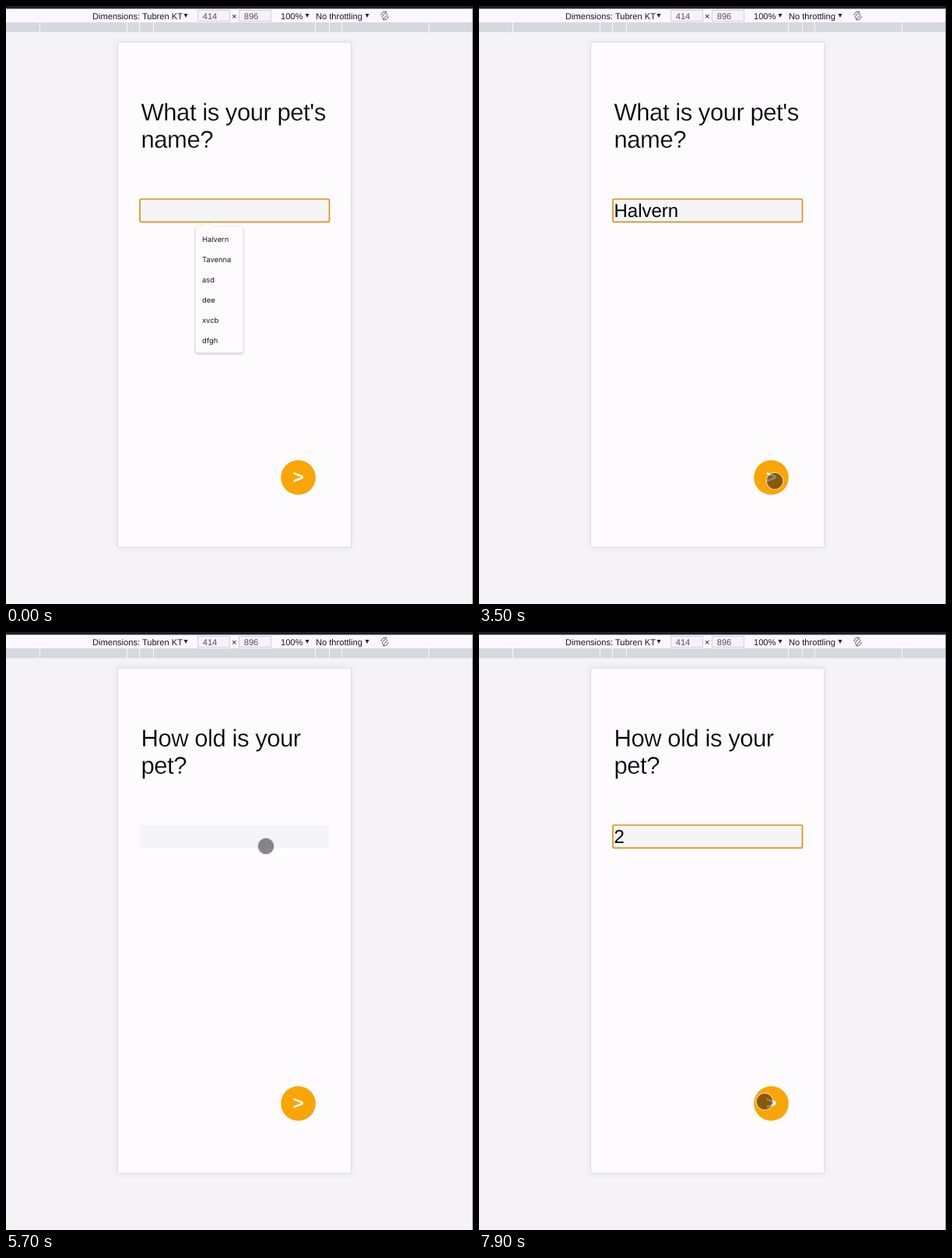
Write an HTML page that moves like this. It is 600 by 768 pixels and loops after 8000 ms.

```html
<!DOCTYPE html>
<html lang="en">
<head>
<meta charset="utf-8">
<title>Pet form</title>
<style>
  html, body { margin: 0; width: 100%; height: 100%; overflow: hidden; background: #f5f3f7; }
  svg { display: block; width: 600px; height: 768px; }
  text { font-family: "Liberation Sans", Arial, sans-serif; white-space: pre; text-rendering: geometricPrecision; }
  .bar { font-size: 11.1px; fill: #1a161e; }
  .size { fill: #55515a; text-anchor: middle; }
  .box { fill: #f5f2f8; stroke: #d2cfd8; }
  .title { font-size: 31px; letter-spacing: -.45px; stroke: #fdfbfe; stroke-width: .3px; }
  .item { font-family: Inter, "Liberation Sans", sans-serif; font-size: 9.4px; fill: #18161a; }
  .value { font-size: 24px; }
  .next { font-size: 24px; font-weight: 700; fill: #fff; text-anchor: middle; }
  .menu { filter: drop-shadow(0 1px 1.5px rgba(0, 0, 0, .3)); }
  .phone { filter: drop-shadow(0 0 5px rgba(0, 0, 0, .06)); }
</style>
</head>
<body>
<svg viewBox="0 0 600 768">
  <rect width="600" height="768" fill="#f5f3f7"/>
  <rect width="600" height="21" fill="#fbf8fd"/>
  <rect width="600" height="3.5" fill="#251c28"/>
  <rect y="21" width="600" height="12.5" fill="#d6d8df"/>
  <path id="ticks" stroke="#f7f6f9"/>

  <text class="bar" x="111" y="17">Dimensions: Tubren KT</text>
  <rect class="box" x="246.5" y="5.5" width="41" height="14"/>
  <text class="bar size" x="262" y="17">414</text>
  <text class="bar" x="290" y="17">×</text>
  <rect class="box" x="299.5" y="5.5" width="41" height="14"/>
  <text class="bar size" x="315" y="17">896</text>
  <text class="bar" x="353" y="17">100%</text>
  <text class="bar" x="398" y="17">No throttling</text>
  <path d="M228.500 10h5l-2.500 5zM384.500 10h5l-2.500 5zM461.500 10h5l-2.500 5z" fill="#28242c"/>
  <g fill="none" stroke="#4b4750" transform="translate(486.500 12.500) rotate(40) scale(.88)">
    <rect x="-2" y="-4.200" width="4" height="8.400" rx="1"/>
    <path d="M-1-6.200A6 6 0 0 0-4.500 3M1 6.200A6 6 0 0 0 4.500-3"/>
  </g>

  <rect class="phone" x="143.500" y="46.500" width="300" height="648.500" fill="#fdfbfe" stroke="#dedde1"/>
  <text class="title" x="173.500" y="147" id="line1"></text>
  <text class="title" x="173.500" y="182" id="line2"></text>

  <rect x="172" y="248" width="243" height="29" fill="#f5f4f6"/>
  <rect id="ring" x="172" y="248" width="243.500" height="29.300" rx="1.500" fill="none" stroke="#d9941a" stroke-width="1.700"/>
  <text class="value" x="173.500" y="271" id="value"></text>
  <rect id="caret" y="249" width="1.200" height="27" fill="#222"/>

  <g class="menu" id="menu">
    <rect id="panel" x="243.500" y="283.500" width="61" rx="3" fill="#fdfbfe"/>
    <path d="M252 284l6.500-6 6.500 6z" fill="#fdfbfe"/>
    <g id="items"></g>
  </g>

  <circle cx="375.500" cy="605.500" r="22.300" fill="#f9a504"/>
  <text class="next" x="375.500" y="613">&gt;</text>
  <g id="touch">
    <circle r="10.300" fill-opacity=".46"/>
    <circle r="11" fill="none" stroke="#e4e0e4" stroke-opacity=".5" stroke-width="1.500"/>
  </g>
  <path d="M599.500 3v765" stroke="#8f8d92"/>
</svg>
<script>
const LOOP = 8000, STEP = 100;
const NAME = "Halvern", FIRST_KEY = 100, KEY_GAP = 300;
const SUBMIT = 3900, FOCUS = 6200, AGE_KEY = 7200;
const OPTIONS = [NAME, "Tavenna", "asd", "dee", "xvcb", "dfgh"];

const linear = k => k;
const easeOut = k => 1 - (1 - k) ** 2;

// Pointer moves along Bezier curves; each shows from `at` until `until`.
const MOVES = [
  { at: 2700, until: 3700, time: 800, ease: easeOut, path: [[592, 470], [450, 590], [380, 610]] },
  { at: 3700, until: 4700, time: 1000, ease: linear, path: [[380, 610], [390, 619]] },
  { at: 4700, until: 6200, time: 1000, ease: easeOut, path: [[390, 619], [620, 500], [222, 90], [334, 275]] },
  { at: 6200, until: 6500, time: 200, ease: linear, path: [[334, 275], [453, 277]] },
  { at: 7300, until: 7600, time: 200, ease: easeOut, path: [[493, 640], [432, 655]] },
  { at: 7600, until: 8000, time: 300, ease: easeOut, path: [[432, 655], [367, 603]] }
];

const el = id => document.getElementById(id);
const show = (node, on) => { node.style.display = on ? "" : "none"; };
const mix = (a, b, k) => a.map((v, i) => v + (b[i] - v) * k);

function bezier(points, k) {
  if (points.length === 1) return points[0];
  return bezier(points.slice(1).map((p, i) => mix(points[i], p, k)), k);
}

function pointerAt(t) {
  const move = MOVES.find(m => t >= m.at && t < m.until);
  return move && bezier(move.path, move.ease(Math.min(1, (t - move.at) / move.time)));
}

el("ticks").setAttribute("d",
  [43, 155, 171, 189, 397, 415, 431, 543].map(x => `M${x + .5} 21v12.5`).join(""));

const items = OPTIONS.map((word, i) => {
  const node = document.createElementNS("http://www.w3.org/2000/svg", "text");
  node.setAttribute("class", "item");
  node.setAttribute("x", 252);
  node.setAttribute("y", 303 + 26 * i);
  node.textContent = word;
  el("items").append(node);
  return node;
});

function draw(t) {
  const second = t >= SUBMIT;
  const typed = Math.min(NAME.length, Math.floor((t - FIRST_KEY) / KEY_GAP) + 1);
  const focused = !second || t >= FOCUS;

  el("line1").textContent = second ? "How old is your" : "What is your pet's";
  el("line2").textContent = second ? "pet?" : "name?";
  el("value").textContent = second ? (t >= AGE_KEY ? "2" : "") : NAME.slice(0, typed);
  show(el("ring"), focused);

  // The caret restarts its blink on every input.
  const nameKey = FIRST_KEY + (typed - 1) * KEY_GAP;
  const last = !second ? nameKey : t >= AGE_KEY ? AGE_KEY : FOCUS;
  show(el("caret"), focused && t >= FIRST_KEY && (t - last) % 1000 < 500);
  el("caret").setAttribute("x", 173.2 + el("value").getComputedTextLength());

  const count = typed ? 1 : OPTIONS.length;
  show(el("menu"), typed < NAME.length);
  el("panel").setAttribute("height", 6 + 26 * count);
  items.forEach((node, i) => show(node, i < count));

  const p = pointerAt(t);
  show(el("touch"), p);
  if (p) el("touch").setAttribute("transform", `translate(${p})`);
}

const start = performance.now();
function tick() {
  const t = (performance.now() - start) % LOOP;
  draw(Math.floor(t / STEP) * STEP);
  requestAnimationFrame(tick);
}
tick();
</script>
</body>
</html>
```
